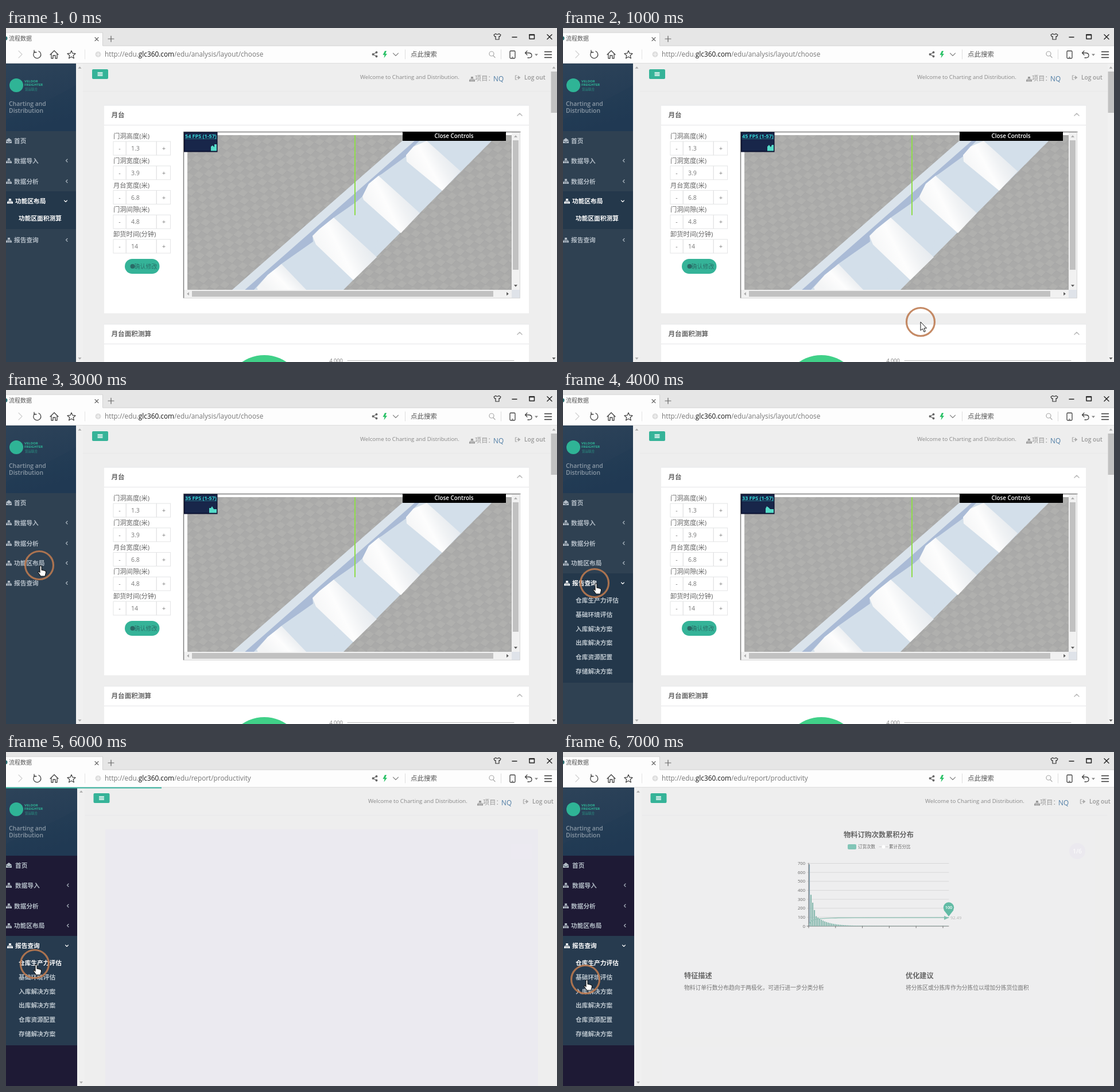
Recreate the animation shown at these times as an HTML page. Size 960 px wide and 583 px high, loop 8000 ms.

```html
<!DOCTYPE html>
<html lang="zh">
<head>
<meta charset="utf-8">
<title>流程数据</title>
<style>
html, body { margin: 0; width: 100%; height: 100%; overflow: hidden; background: #eee; }
svg { display: block; width: 960px; height: 583px; font-family: "Open Sans", "Noto Sans CJK SC", sans-serif; }
text { white-space: pre; }
.line { fill: none; stroke-linecap: round; stroke-linejoin: round; }
.timed { animation: 8s step-end infinite; visibility: hidden; }
.pointer { animation: move 8s step-end infinite; }
@keyframes move {
  0%, 12.5% { transform: translate(623px, 513px); }
  25% { transform: translate(60px, 317px); }
  37.5% { transform: translate(58px, 306px); }
  50% { transform: translate(55px, 337px); }
  62.5% { transform: translate(53.5px, 367.5px); }
  75% { transform: translate(50px, 370px); }
  87.5%, 100% { transform: translate(39px, 397px); }
}
</style>
</head>
<body>
<svg id="stage" viewBox="0 0 960 583">
  <defs>
    <pattern id="floor" width="18" height="14" patternUnits="userSpaceOnUse" patternTransform="rotate(-8)">
      <rect width="18" height="14" fill="#aaaaa9"/>
      <path d="M0 7L9 0L18 7L9 14Z" fill="#b0b0ae"/>
      <path d="M0 7L9 14L18 7" fill="none" stroke="#a4a4a4" stroke-width="1"/>
    </pattern>
    <linearGradient id="ramp" x1=".1" y1=".75" x2=".9" y2=".35">
      <stop offset="0" stop-color="#f3f4f5"/><stop offset=".45" stop-color="#fdfdfd"/>
      <stop offset=".7" stop-color="#f0f2f4"/><stop offset="1" stop-color="#e4e9ee"/>
    </linearGradient>
    <linearGradient id="head" x1="0" y1="0" x2=".3" y2="1">
      <stop offset="0" stop-color="#2d4359"/><stop offset="1" stop-color="#213a54"/>
    </linearGradient>
    <clipPath id="view"><rect x="316" y="187" width="565" height="270"/></clipPath>
  </defs>
</svg>
<script>
const TEAL = '#35b398', rules = new Set();

const text = (x, y, s, size, fill = '#777', more = '') =>
  `<text x="${x}" y="${y}" font-size="${size}" fill="${fill}" ${more}>${s}</text>`;
const rect = (x, y, w, h, fill, more = '') =>
  `<rect x="${x}" y="${y}" width="${w}" height="${h}" fill="${fill}" ${more}/>`;
const line = (d, stroke, w = 1) => `<path class="line" d="${d}" stroke="${stroke}" stroke-width="${w}"/>`;
const shape = (d, fill) => `<path d="${d}" fill="${fill}"/>`;
const dot = (x, y, r, fill, more = '') => `<circle cx="${x}" cy="${y}" r="${r}" fill="${fill}" ${more}/>`;
const group = (x, y, s) => `<g transform="translate(${x} ${y})">${s}</g>`;
const BOLD = 'font-weight="600"', MID = 'text-anchor="middle"', END = 'text-anchor="end"';

// Shows its content from second a to second b of the loop.
function during(a, b, s) {
  rules.add(`@keyframes on${a}to${b} { 0% { visibility: hidden } ${a * 12.5}% { visibility: visible } ${b * 12.5}% { visibility: hidden } }`);
  return `<g class="timed" style="animation-name:on${a}to${b}">${s}</g>`;
}

const arrow = (x, y, turn, fill = '#555') =>
  `<path transform="translate(${x} ${y}) rotate(${turn})" d="M-3 1.8L0 -1.8L3 1.8Z" fill="${fill}"/>`;
const tree = (x, y, fill) => group(x, y,
  shape('M-2 -4h4v3h-4zM-5 1.5h3v3h-3zM-1.5 1.5h3v3h-3zM2 1.5h3v3h-3z', fill) + line('M-3.5 1.5V.2H3.5V1.5M0 -1V1.5', fill, .9));

function browser() {
  const ink = '#444';
  return rect(0, 0, 960, 31, '#e6e6e6') + rect(0, 31, 960, 31, '#fdfdfd')
    + shape('M0 8H168V32H0Z', '#fdfdfd') + line('M0 8H168.500V31H960', '#d2d2d2')
    + line('M0 61.500H960', '#dedede')
    + during(0, 5, dot(-1, 18, 3.5, '#2a6f73')) + during(6, 8, dot(-1, 18, 3.5, '#2a6f73'))
    + text(5, 22, '流程数据', 10, '#555')
    + line('M155 16.500L161 22.500M161 16.500L155 22.500', '#666', 1.1)
    + line('M178 19H188M183 14V24', '#666', 1.2)
    + line('M853 10L850 12L851.500 15L853 14.500V20H859V14.500L860.500 15L862 12L859 10Q856 12.500 853 10Z', '#333', 1.2)
    + line('M882 16H890', '#222', 1.5) + line('M912 11.500H920.500V19H912Z', '#222', 1.5) + line('M912 12H920', '#222', 2)
    + line('M943 11.500L951 19.500M951 11.500L943 19.500', '#222', 1.4)
    + line('M22 40L28 46L22 52', '#d0d0d0', 1.2)
    + during(0, 5, reload()) + during(6, 8, reload())
    + during(5, 6, line('M49.500 41.500L60 52M60 41.500L49.500 52', ink, 1.4))
    + line('M77 46.500L84 39.500L91 46.500M79 45V53H82V48H86V53H89V45', ink, 1.3)
    + line('M114 39.500L116 44.200L121 44.700L117.200 48L118.400 53L114 50.300L109.600 53L110.800 48L107 44.700L112 44.200Z', ink, 1.2)
    + line('M137.500 38V54', '#e5e5e5')
    + during(0, 5, globe()) + during(6, 8, globe())
    + during(5, 6, shape('M155 41L160.500 39L166 41V47Q165 51 160.500 53Q156 51 155 47Z', '#35bd7d') + line('M160.500 43V49M157.500 46H163.500', '#fff', 1.6))
    + during(0, 5, url('analysis/layout/choose')) + during(5, 8, url('report/productivity'))
    + line('M645.500 42.500L639.500 46L645.500 49.500', '#666', 1.1)
    + dot(645.5, 42.5, 1.9, '#666') + dot(639.5, 46, 1.9, '#666') + dot(645.5, 49.5, 1.9, '#666')
    + shape('M660 40L656.500 47H659.500L658.500 52.500L664 45H661L663 40Z', '#2fc26a')
    + line('M674.500 44L679 48.500L683.500 44', '#888', 1.1) + line('M695.500 38V54', '#ddd')
    + text(705, 50, '点此搜索', 11.5, '#555')
    + `<circle cx="846" cy="45" r="4" fill="none" stroke="#aaa" stroke-width="1.2"/>` + line('M849 48.500L852 51.500', '#aaa', 1.2)
    + line('M862.500 38V54', '#ddd')
    + `<rect x="878" y="40" width="9" height="13" rx="1.500" fill="none" stroke="#444" stroke-width="1.3"/>` + line('M881.500 51H883.500', ink)
    + line('M908 40L904.500 43.500L908 47M905 43.500H911.500Q916 44 916 48Q916 52 911 52H909', ink, 1.3)
    + arrow(924, 47, 180, '#888') + line('M938.500 41.500H950.500M938.500 46.500H950.500M938.500 51.500H950.500', '#333', 1.5);
}
const reload = () => line('M50 41.500A6.500 6.500 0 1 0 57 40.500', '#444', 1.3) + line('M49 39V42.500H53', '#444', 1.3);
const globe = () => dot(160.5, 46, 5, '#ddd') + line('M157.500 46H163.500M160.500 43V49', '#f4f4f4', 1.2);
const url = path => text(172, 50, `http://edu.<tspan fill="#111">glc360.com</tspan>/edu/${path}`, 11.8, '#777');

function item(label, y, open, dx = 0, arrowX = 106) {
  const fill = open ? '#fff' : '#b1bbc5', x = open ? 16 : 14 + dx;
  const mark = open ? `M${arrowX - 4.500} ${y - 1}l2.500 2.500l2.500 -2.500` : `M${arrowX + 1} ${y - 2.500}l-2.500 2.500l2.500 2.500`;
  return tree(open ? 7 : 5, y, fill) + text(x, y + 4, label, 10.7, fill, BOLD) + line(mark, fill, 1.1);
}
const home = (x, y) => shape(`M0 ${y - 1}L5 ${y - 5}L10 ${y - 1}V${y + 4}H0Z`, '#b1bbc5')
  + line(`M0.500 ${y}L5 ${y + 2.500}L9.500 ${y}`, '#334659', 1) + text(x, y + 4, '首页', 10.7, '#b1bbc5', BOLD);
const sub = (label, y, fill = '#bac4cc') => text(22, y + 4, label, 10.7, fill, BOLD);
const reports = (y, first) => sub('仓库生产力评估', y, first)
  + ['基础环境评估', '入库解决方案', '出库解决方案', '仓库资源配置', '存储解决方案'].map((s, i) => sub(s, y + 24.8 * (i + 1))).join('');

const brand = (w, dy) => rect(0, 62, w, 118 + dy, 'url(#head)')
  + shape(`M0 160Q70 130 ${w} 100V${180 + dy}H0Z`, '#1d355030')
  + dot(18, 100, 12, '#2fb496')
  + text(32, 95, 'VELDOR', 6, '#2fb496', 'font-weight="700"') + text(32, 101, 'FREIGHTER', 6, '#2fb496', 'font-weight="700"')
  + text(33, 109, '货运联合', 5.5, '#2a9584')
  + text(5, 135.5 + dy, 'Charting and', 10.4, '#8b99a6', BOLD) + text(5, 148 + dy, 'Distribution', 10.4, '#8b99a6', BOLD);

function sideOld() {
  const dark = '#24384b';
  return rect(0, 62, 122, 521, '#2f4152') + brand(122, 0) + home(14, 197)
    + item('数据导入', 231.5) + item('数据分析', 267.5)
    + during(0, 3, rect(0, 285, 122, 66, dark) + item('功能区布局', 302, true) + sub('功能区面积测算', 332, '#fff') + item('报告查询', 370))
    + during(3, 6, item('功能区布局', 302))
    + during(3, 4, item('报告查询', 337))
    + during(4, 6, rect(0, 320, 122, 191, dark) + item('报告查询', 337, true) + reports(367));
}
const sideNew = () => rect(0, 62, 124, 521, '#1e1a35') + brand(124, 1) + home(16, 198)
  + item('数据导入', 232.5, false, 2, 108) + item('数据分析', 268.5, false, 0, 108) + item('功能区布局', 303, false, 0, 108)
  + rect(0, 321, 124, 191, '#273b4f') + item('报告查询', 338, true, 0, 108) + reports(368, '#fff');

const topbar = (dx, bx) => rect(bx, 72, 28, 17, TEAL, 'rx="2"')
  + line(`M${bx + 10} 78H${bx + 18}M${bx + 10} 80.500H${bx + 18}M${bx + 10} 83H${bx + 18}`, '#fff', 1.3)
  + group(dx, 0, text(617, 89, 'Welcome to Charting and Distribution.', 9.7, '#888')
    + tree(812, 89, '#999') + text(817, 92, '项目：', 11.2, '#999') + text(849, 92.5, 'NQ', 11.8, '#4f7da5')
    + line('M890 83H887.500V90H890M890 86.500H893', '#aaa', 1.2) + shape('M892 83L896.500 86.500L892 90Z', '#aaa')
    + text(903, 90, 'Log out', 10.2, '#999', BOLD));

function field(label, value, i) {
  const y = 198 + i * 42.75;
  return text(187, y - 5, label, 11.3, '#666')
    + [[187, 22], [209.5, 52.5], [262.5, 24]].map(([x, w]) => rect(x, y, w, 24, '#fff', 'stroke="#e4e5e6"')).join('')
    + text(198, y + 16, '-', 10.5, '#777', MID) + text(218, y + 16, value, 10.5) + text(275, y + 16, '+', 10.5, '#777', MID);
}

function fps(a, b, n, bars) {
  return during(a, b, text(312, 192, `${n} FPS (1-57)`, 9, '#35d5d5', 'font-weight="700"') + shape(bars + 'V214.500Z', '#55dcc9'));
}

function scene() {
  const ramps = ['M437 453L456 431L480 412L526 460H440Z', 'M534 363L546 351L571 331L646 400L605 440L540 378Z',
    'M621 294L632 272L649 258L721 323L688 358L623 300Z', 'M697 222L710 207L733 197L792 250L760 284L698 233Z'];
  return rect(309, 181, 587, 291, '#f1f1f1') + rect(310, 182, 571, 275, '#fff')
    + `<g clip-path="url(#view)">` + rect(316, 187, 565, 270, 'url(#floor)')
    + shape('M392 459L702 187H856L586 459Z', '#d3dfea') + shape('M392 459L702 187H724L414 459Z', '#dae3eb')
    + shape('M414 459L712 197H720L710 207L697 222L698 233L649 258L632 272L621 294L610 304L571 331L546 351L534 363L535 373L479 413L456 431L430 459Z', '#aabbd6')
    + shape('M435 456L478 413L535 373L534 384L580 420L548 459H520L480 414ZM571 332L621 296L622 301L660 337L640 394ZM649 259L697 224L699 234L740 270L718 318Z', '#d3dfea')
    + ramps.map(d => shape(d, 'url(#ramp)')).join('') + line('M608 187V326', '#8fdc4c', 2) + '</g>'
    + line('M309.500 471V181.500H896', '#808080', 1.5) + line('M310 471.500H895.500V182', '#d8d8d8')
    + rect(883, 196, 10, 226, '#c1c1c1') + arrow(888, 189, 0, '#aaa') + arrow(888, 450, 180)
    + rect(324, 459, 525, 10, '#c1c1c1') + arrow(317, 464, -90, '#aaa') + arrow(874, 464, 90) + rect(881, 457, 14, 14, '#dfe3e9')
    + rect(310, 181.5, 58.5, 35, '#0b1130') + rect(312, 183, 55, 31.5, '#18264a') + line('M312 193.500H367', '#2b8f98', .7)
    + fps(0, 1, 54, 'M357 214.500V207L360 205L363 208V203H367') + fps(1, 2, 45, 'M356 214.500V207L359 204L362 208L364 204H367')
    + fps(2, 3, 30, 'M355 214.500V206H358L360 203L363 208H367') + fps(3, 4, 35, 'M354 214.500V206H357L359 203L362 208H367')
    + fps(4, 5, 33, 'M353 214.500V207L355 203L358 205L361 208H367') + fps(5, 6, 32, 'M352 214.500V205L355 203L357 207L360 203L363 208H367')
    + rect(691, 181, 180, 16, '#000') + text(780.5, 192, 'Close Controls', 9.9, '#fff', MID + ' ' + BOLD);
}

const panel = (y, h, title) => rect(171, y, 740, h, '#fff') + line(`M171 ${y}H911M171 ${y + 34.500}H911`, '#e5e6e8')
  + text(183.5, y + 20.5, title, 11.6, '#666', BOLD) + line(`M891 ${y + 18}L895 ${y + 14}L899 ${y + 18}`, '#bbb', 1.6);

function pageOld() {
  const fields = [['门洞高度(米)', '1.3'], ['门洞宽度(米)', '3.9'], ['月台宽度(米)', '6.8'], ['门洞间隙(米)', '4.8'], ['卸货时间(分钟)', '14']];
  return rect(122, 62, 838, 521, '#eee') + rect(122, 62, 12, 521, '#f0f0f0') + line('M134 110.500H949', '#e9e9e9')
    + arrow(128.5, 69, 0, '#aaa') + arrow(128.5, 577, 180, '#aaa')
    + rect(949, 62, 11, 521, '#f1f1f1') + rect(949.5, 76, 10.5, 72, '#c1c1c1') + arrow(954.5, 69, 0, '#aaa') + arrow(954.5, 577, 180)
    + topbar(0, 150) + panel(135, 363, '月台') + fields.map((f, i) => field(...f, i)).join('')
    + rect(207, 403, 60.5, 26, TEAL, 'rx="13"') + dot(220.5, 416, 4, '#2a6a66') + text(223.5, 420, '确认修改', 10, '#2a716a')
    + scene() + panel(517, 66, '月台面积测算')
    + dot(450, 640, 69, '#40d088') + text(563.5, 584, '4,000', 9.2, '#777') + line('M595 580.500H885', '#bbb');
}

function chart() {
  const py = v => 304 - v * 109.5 / 700, head = [690, 350, 262, 180];
  let s = '';
  for (let v = 0; v <= 700; v += 100) {
    s += line(`M425 ${py(v)}H672`, v ? '#d2d2d2' : '#777', v ? .8 : 1) + text(422, py(v) + 2.5, v, 7.6, '#666', END);
  }
  for (let i = 0; i < 81; i++) {
    const y = py(head[i] ?? 108 * Math.exp((4 - i) / 6.5) + 3);
    s += rect(428 + i * 3, y, 2.1, 304 - y, i ? '#86b9ae' : '#8ba9b8');
  }
  for (let x = 428; x < 672; x += 46.8) s += line(`M${x} 304V307`, '#777');
  return s + line('M428 194V304', '#777') + line('M429 301C432 290 445 291 480 289.500L672 289', '#93c3b7', 1.3)
    + shape('M664 286L672 289.500L664 293Z', '#7fc0b0') + shape('M663.500 276L672 287L680.500 276Z', '#62bba5') + dot(672, 271.5, 9.2, '#62bba5')
    + text(672, 274.3, '100', 7.4, '#fff', MID + ' ' + BOLD) + text(675, 292, '92.49', 7.6, '#b5b5b5');
}

function pageNew() {
  return rect(124, 62, 836, 521, '#eee') + rect(124, 62, 13, 521, '#f0f0f0') + line('M138 110.500H948', '#e9e9ea')
    + arrow(131, 69, 0, '#aaa') + arrow(131, 577, 180, '#aaa') + topbar(14, 152.5)
    + during(6, 7, rect(173, 135, 754, 448, '#ebeaf0') + rect(880, 160, 37, 27, '#eceaf1') + rect(0, 61.5, 271, 2, '#36b39f'))
    + during(7, 8, rect(173, 135, 754, 363, '#eeeeef') + rect(173, 515, 754, 68, '#eeeeef')
      + text(550, 149, '物料订购次数累积分布', 12.2, '#666', MID + ' ' + BOLD)
      + rect(496, 161, 15, 9, '#82c5b7', 'rx="2"') + text(514, 168, '订货次数', 7.5, '#666')
      + line('M551 165.500H566', '#ccc') + dot(558.5, 165.5, 3, '#fff') + text(568, 168, '累计百分比', 7.5, '#666')
      + dot(896, 173, 14, '#ebe9ef') + text(896, 177, '1/6', 10.5, '#fafafa', MID + ' ' + BOLD) + chart()
      + text(211, 395, '特征描述', 12.2, '#666', BOLD) + text(211, 415, '物料订单行数分布趋向于两极化，可进行进一步分类分析', 9.76, '#777')
      + text(597, 395, '优化建议', 12.2, '#666', BOLD) + text(597, 415, '将分拣区或分拣库作为分拣位以增加分拣货位面积', 9.77, '#777'));
}

const hand = '<path d="M0 1.500Q1.500 0 3 1.500V8L9 9.500Q11 10 10.500 13L9 19H1.500L-3 12.500Q-3.500 10.500 -1.500 11L0 12.500Z" fill="#fff" stroke="#111" stroke-width="1.1"/>';
const tip = '<path d="M0 0V15L3.500 12L6 17.500L8.300 16.500L6 11H10.500Z" fill="#fff" stroke="#111" stroke-width="1"/>';
const pointer = during(1, 8, `<g class="pointer"><circle r="24.500" fill="none" stroke="#bd7a50" stroke-width="3.2" opacity=".88"/>`
  + during(1, 2, tip) + during(2, 8, group(1, 0, hand)) + '</g>');

document.getElementById('stage').insertAdjacentHTML('beforeend',
  browser() + during(0, 6, pageOld() + sideOld()) + during(6, 8, sideNew() + pageNew()) + pointer);
document.head.insertAdjacentHTML('beforeend', `<style>${[...rules].join('\n')}</style>`);
</script>
</body>
</html>
```
